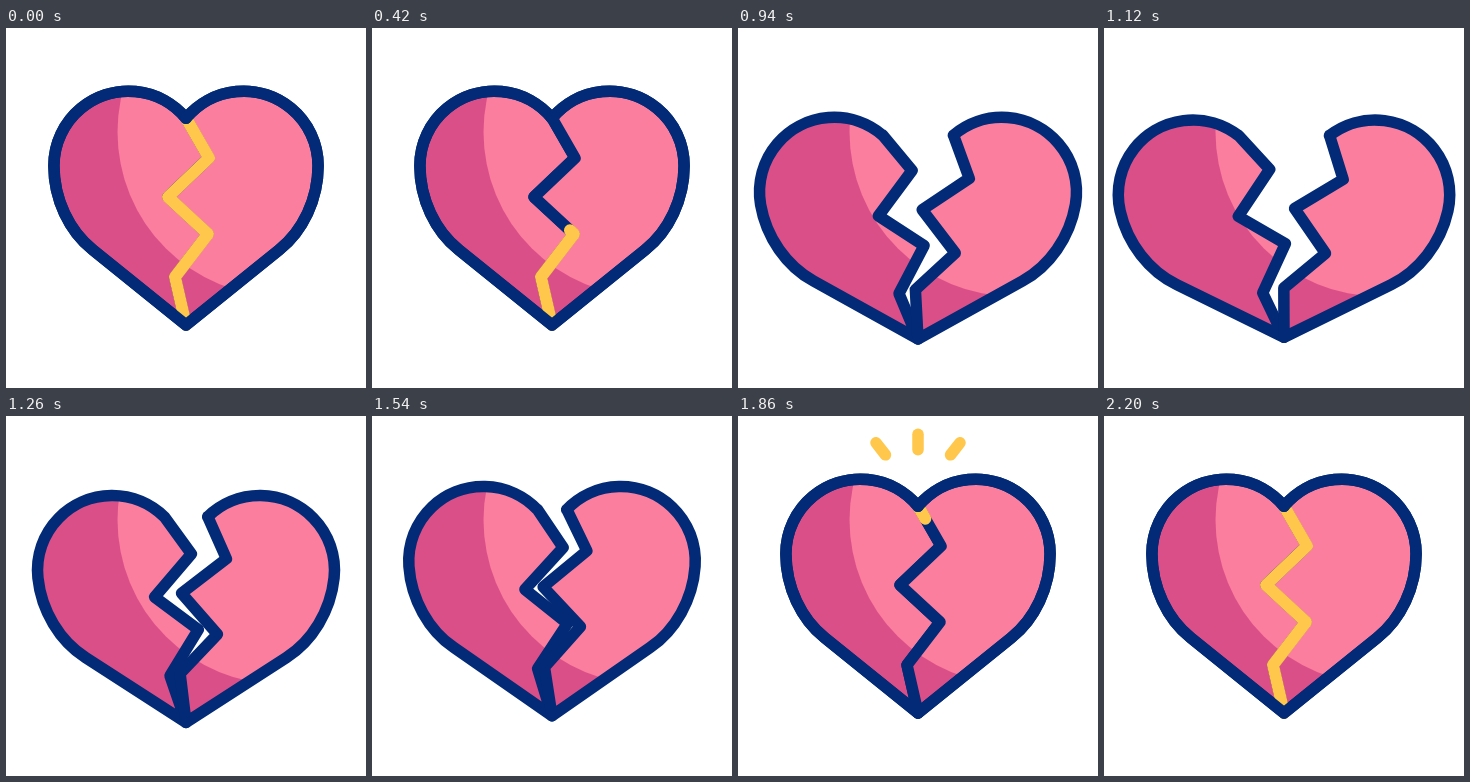
Recreate the animation shown at these times as an HTML page with a canvas. Size 360 by 360 pixels, loop 2400 ms.

```html
<!DOCTYPE html>
<html lang="en">
<head>
<meta charset="utf-8">
<title>Mending heart</title>
<style>
html, body { margin: 0; width: 100%; height: 100%; overflow: hidden; background: #fff; }
canvas { display: block; }
</style>
</head>
<body>
<canvas id="stage" width="360" height="360"></canvas>
<script>
const ctx = document.getElementById('stage').getContext('2d');
const LOOP = 2400, NAVY = '#022a76', DARK = '#da4f88', PINK = '#fc7e9f', GOLD = '#ffc74b';
const TIP = { x: 180, y: 297 };

// Heart coordinates are relative to the bottom tip.
const crack = [[0, -207], [23, -167], [-18, -128], [22, -91], [-11, -48], [0, 0]];
const crackLength = crack.slice(1).reduce(
  (sum, [x, y], i) => sum + Math.hypot(x - crack[i][0], y - crack[i][1]), 0);

// side: -1 left, 1 right
function outerEdge(side) {
  const p = new Path2D();
  const left = side < 0;
  p.arc(side * 57.5, -159.2, 74.6, left ? -0.69 : Math.PI + 0.69, left ? Math.PI : 0, left);
  p.bezierCurveTo(side * 132.1, -126, side * 117, -94, side * 93, -75);
  p.lineTo(0, 0);
  return p;
}

function halfHeart(side) {
  const p = outerEdge(side);
  for (const [x, y] of crack.slice(0, -1).reverse()) p.lineTo(x, y);
  p.closePath();
  return p;
}

const crackPath = new Path2D();
crack.forEach(([x, y]) => crackPath.lineTo(x, y));
const sides = [-1, 1].map(side => ({ side, half: halfHeart(side), edge: outerEdge(side) }));

const clamp = u => Math.min(1, Math.max(0, u));
const progress = (t, a, b) => clamp((t - a) / (b - a));
const smooth = u => (1 - Math.cos(Math.PI * u)) / 2;
const easeOut = u => 1 - (1 - u) ** 3;

// Eased value through [time, value] keys
function track(t, keys) {
  let value = keys[0][1];
  for (let i = 1; i < keys.length; i++) {
    value += (keys[i][1] - keys[i - 1][1]) * smooth(progress(t, keys[i - 1][0], keys[i][0]));
  }
  return value;
}

const openAngle = t => track(t, [[590, 0], [1105, 12.8], [1390, 1], [1550, 4.1], [1730, 0]]);
const drop = t => track(t, [[590, 0], [920, 14], [1800, 0]]);

function stroke(path, color, width = 11.5) {
  ctx.strokeStyle = color;
  ctx.lineWidth = width;
  ctx.stroke(path);
}

function drawHalf({ side, half }, angle, dy) {
  ctx.save();
  ctx.translate(TIP.x, TIP.y + dy);
  ctx.rotate(side * angle);
  ctx.fillStyle = DARK;
  ctx.fill(half);
  ctx.save();
  ctx.clip(half);
  // The light area stays still while the halves move.
  ctx.resetTransform();
  ctx.fillStyle = PINK;
  ctx.beginPath();
  ctx.arc(276, 104, 164.5, 0, 7);
  ctx.fill();
  ctx.restore();
  stroke(half, NAVY);
  ctx.restore();
}

function drawGold(t) {
  const from = crackLength * smooth(progress(t, 200, 600));
  const to = crackLength * smooth(progress(t, 1800, 2200));
  const mending = t > 1700;
  if (mending ? to <= 0 : from >= crackLength) return;
  ctx.save();
  ctx.translate(TIP.x, TIP.y);
  ctx.setLineDash(mending ? [to, 999] : [crackLength - from + 1, 999]);
  ctx.lineDashOffset = mending ? 0 : -from;
  stroke(crackPath, GOLD, 12);
  ctx.setLineDash([]);
  for (const { edge } of sides) stroke(edge, NAVY);
  ctx.restore();
}

function drawSparks(t) {
  const head = 29 * easeOut(progress(t, 1720, 1940));
  const tail = 29 * smooth(progress(t, 1780, 1960));
  if (head - tail < 0.1) return;
  for (const [x, y, degrees] of [[155, 48.5, -38], [180, 46, 0], [205, 48.5, 38]]) {
    ctx.save();
    ctx.translate(x, y);
    ctx.rotate(degrees * Math.PI / 180);
    const line = new Path2D();
    line.moveTo(0, -tail);
    line.lineTo(0, -head);
    stroke(line, GOLD);
    ctx.restore();
  }
}

function draw(now) {
  const t = now % LOOP;
  ctx.fillStyle = '#fff';
  ctx.fillRect(0, 0, 360, 360);
  ctx.lineCap = ctx.lineJoin = 'round';
  const angle = openAngle(t) * Math.PI / 180;
  for (const part of sides) drawHalf(part, angle, drop(t));
  drawGold(t);
  drawSparks(t);
}

const start = performance.now();
function tick() {
  draw(performance.now() - start);
  requestAnimationFrame(tick);
}
tick();
</script>
</body>
</html>
```
